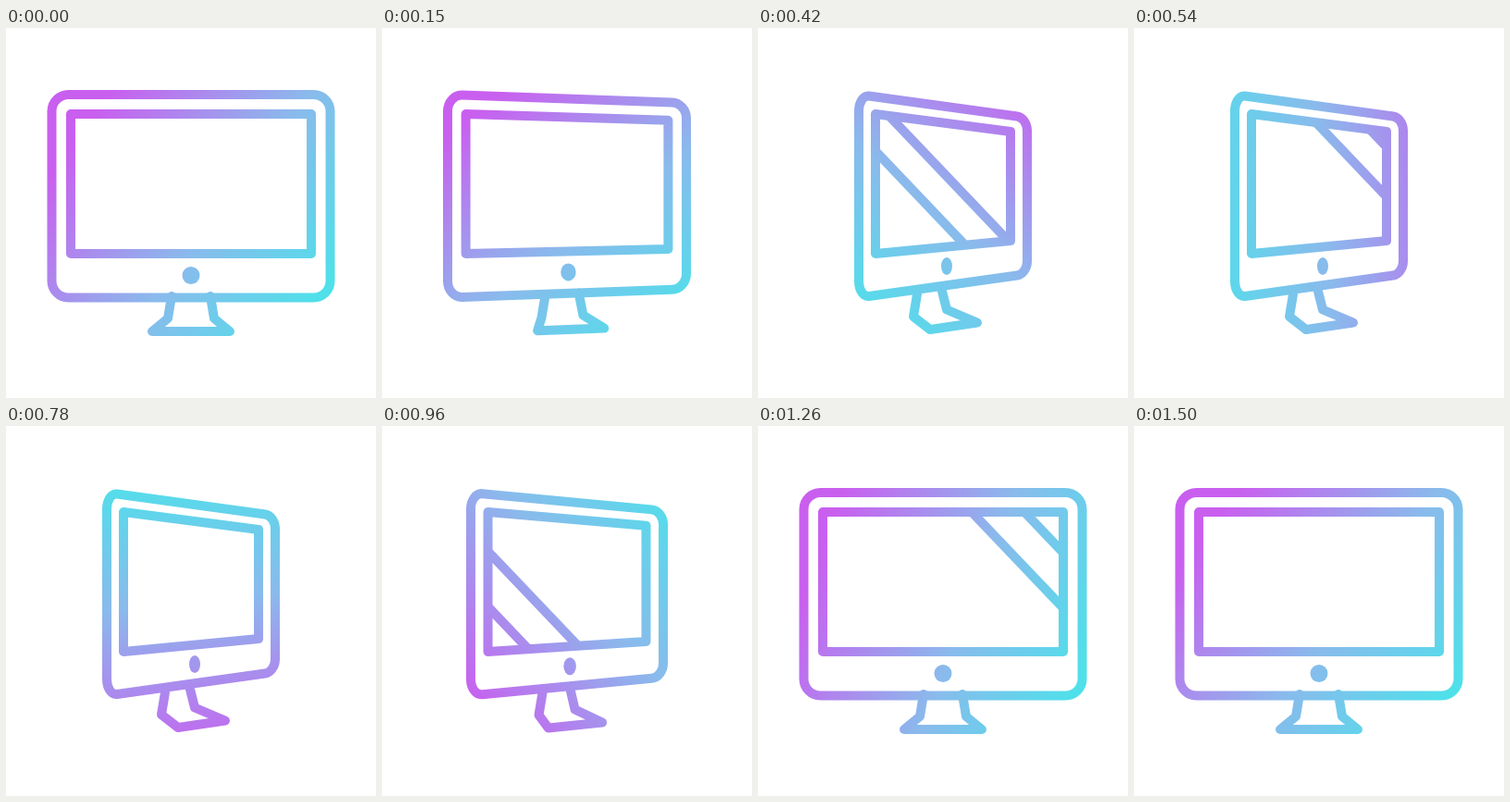
An HTML page that plays this animation: 400x400 px, repeating every 3620 ms.

```html
<!DOCTYPE html>
<html lang="en">
<head>
<meta charset="utf-8">
<title>Monitor</title>
<style>
  html, body { margin: 0; width: 100%; height: 100%; overflow: hidden; background: #fff; }
  svg { display: block; width: 100vw; height: 100vh; }
  .line { fill: none; stroke: url(#tint); stroke-width: 10; stroke-linecap: round; stroke-linejoin: round; }
</style>
</head>
<body>
<svg viewBox="0 0 400 400">
  <defs>
    <linearGradient id="tint" gradientUnits="userSpaceOnUse">
      <stop offset="0" stop-color="#c95fef"/>
      <stop offset=".55" stop-color="#8abaec"/>
      <stop offset="1" stop-color="#4fe0ea"/>
    </linearGradient>
    <clipPath id="glass"><path id="pane"/></clipPath>
  </defs>
  <path id="stand" class="line"/>
  <g clip-path="url(#glass)"><path id="glare" class="line"/></g>
  <path id="screen" class="line"/>
  <path id="body" class="line"/>
  <ellipse id="button" fill="url(#tint)"/>
</svg>
<script>
const STEP = 30, LAST = 50, LOOP = 3620;
const set = (id, attrs) => {
  const node = document.getElementById(id);
  for (const k in attrs) node.setAttribute(k, attrs[k]);
};
const mix = (a, b, s) => a + (b - a) * s;
const between = (p, q, s) => [mix(p[0], q[0], s), mix(p[1], q[1], s)];
const poly = pts => 'M' + pts.map(p => p.join(' ')).join('L');
const smooth = u => u * u * (3 - 2 * u);
const ease = (n, from, to) => smooth(Math.min(1, Math.max(0, (n - from) / (to - from))));

// A box centred on x = 200; turning narrows it and shortens its right side
function box(half, top, bottom, narrow, drop, lift, s) {
  const l = 200 - half + narrow * s, r = 200 + half - narrow * s;
  return [[l, top], [r, top + drop * s], [r, bottom - lift * s], [l, bottom]];
}

// Rounds every corner by a fixed share of its two edges
function rounded(pts) {
  const share = [0.06, 0.082], bend = 0.55;
  return pts.map((p, i) => {
    const a = between(p, pts[(i + 3) % 4], share[(i + 1) % 2]);
    const b = between(p, pts[(i + 1) % 4], share[i % 2]);
    return (i ? 'L' : 'M') + a + 'C' + [between(a, p, bend), between(b, p, bend), b].join(' ');
  }).join('') + 'Z';
}

// Each joint: half width, height, left shift, right shift
function stand(s) {
  const joints = [[21, 290, -7, -23], [25, 314, -7, -21], [42, 328, 28, -5]];
  const left = joints.map(([w, y, l]) => [200 - w + l * s, y - 2 * s]);
  const right = joints.map(([w, y, , r]) => [200 + w + r * s, y - 9.5 * s]);
  return poly([...left, ...right.reverse()]);
}

// Two slowing sweeps of a pair of lines; x is taken at y = 95
function glare(n) {
  const sweep = (x, v, a, d) => x + v * d - a * d * d;
  const first = n < 24;
  const x = first ? sweep(241, 20, 1.2, n - 18) : sweep(170, 22.1, 0.35, n - 36);
  const gap = first ? 51 : 57, slope = 1.05;
  return [x - gap, x].map(c => poly([[c - 40, 95 - 40 * slope], [c + 180, 95 + 180 * slope]])).join('');
}

// One full turn about a centre that leans right with the monitor
function tint(n, s) {
  const u = n / LAST;
  const a = (37 + 360 * smooth(u + 0.27 * u * (1 - u))) * Math.PI / 180;
  const cx = 208 + 14 * s, cy = 203, dx = Math.cos(a) * 157, dy = Math.sin(a) * 157;
  return { x1: cx - dx, y1: cy - dy, x2: cx + dx, y2: cy + dy };
}

function draw(n) {
  const s = ease(n, 0, 12.3) - ease(n, 28.1, 41);
  const pane = poly(box(130, 93, 244, 57, 19, 14, s)) + 'Z';
  set('body', { d: rounded(box(150.5, 72, 291.5, 59.5, 25, 25.5, s)) });
  set('screen', { d: pane });
  set('pane', { d: pane });
  set('stand', { d: stand(s) });
  set('button', { cx: 200 + 4 * s, cy: 267.5 - 10 * s, rx: 9.5 - 3.5 * s, ry: 9.5 });
  set('glare', { d: glare(n) });
  set('tint', tint(n, s));
}

const start = performance.now();
function tick() {
  const t = (performance.now() - start) % LOOP;
  draw(Math.min(LAST, Math.floor(t / STEP)));
  requestAnimationFrame(tick);
}
tick();
</script>
</body>
</html>
```
